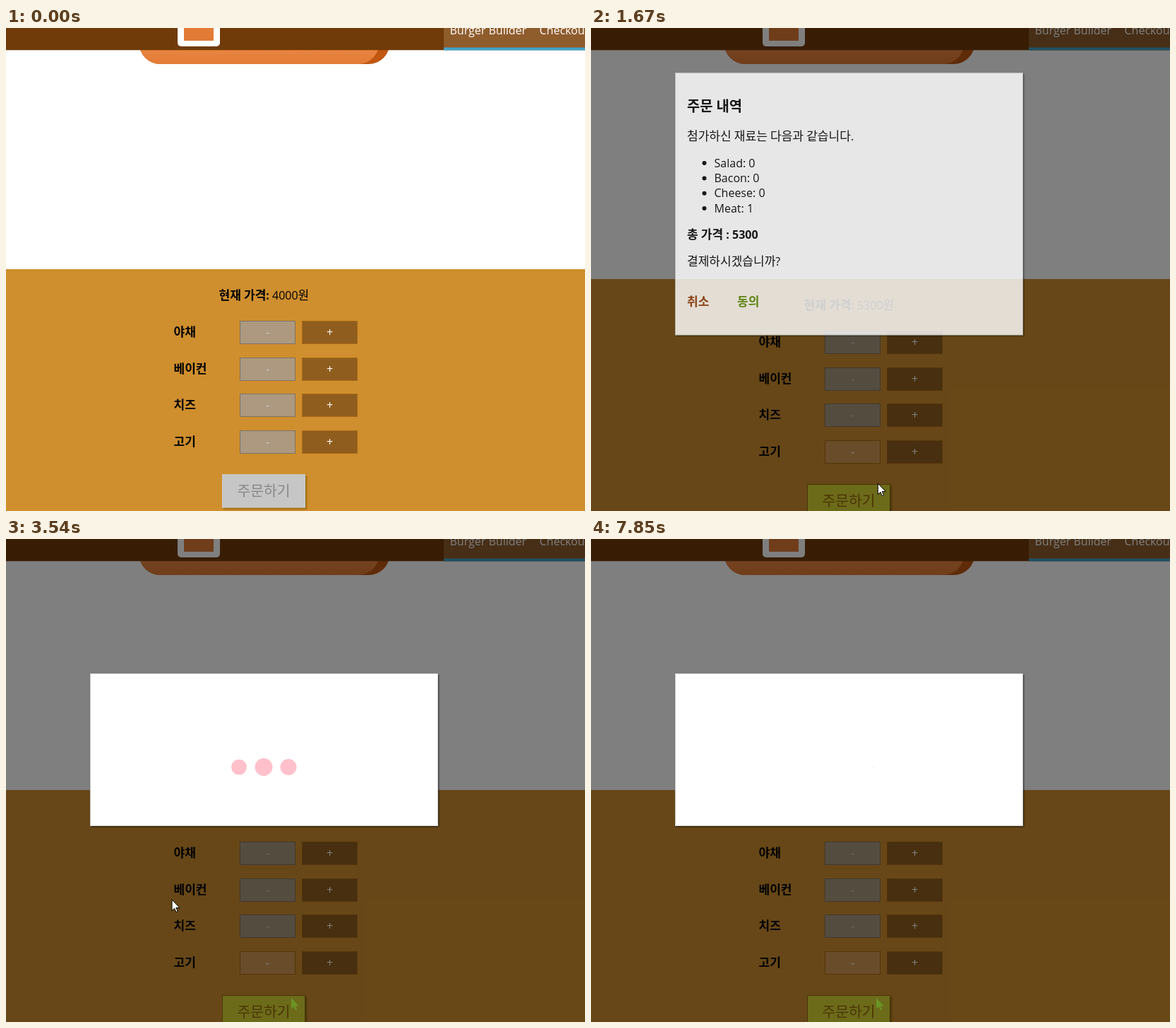
An HTML page that plays this animation: 820 by 683 pixels, repeating every 8160 ms.

```html
<!DOCTYPE html>
<html lang="ko">
<head>
<meta charset="utf-8">
<title>Burger Builder</title>
<style>
html, body { margin: 0; width: 100%; height: 100%; overflow: hidden; background: #fff; }
svg { display: block; width: 100%; height: 100%; }
text { font: 16px "Open Sans", "Noto Sans CJK KR", "Noto Sans CJK", sans-serif; white-space: pre; }
text.bold { font-weight: bold; }
text.mid { text-anchor: middle; }
tspan.ko { font-size: 1.065em; }
</style>
</head>
<body>
<svg id="stage" viewBox="0 0 820 683">
  <defs>
    <linearGradient id="bread" gradientUnits="userSpaceOnUse" x1="0" y1="12" x2="0" y2="51">
      <stop offset="0" stop-color="#f08e4a"/><stop offset="1" stop-color="#e27b36"/>
    </linearGradient>
    <filter id="soft" x="-10%" y="-10%" width="120%" height="120%"><feGaussianBlur stdDeviation="0.8"/></filter>
    <path id="bun" d="M188.5 10H543.5V21A30 30 0 0 1 513.5 51H218.5A30 30 0 0 1 188.5 21Z"/>
    <clipPath id="bunClip"><use href="#bun"/></clipPath>
    <path id="arrowShape" d="M0 0V15.6L3.6 12.3 6 17.6 8.2 16.6 5.9 11.4H10.8Z"/>
  </defs>
  <rect width="820" height="683" fill="#fff"/>
  <use href="#bun" fill="#c15711"/>
  <g clip-path="url(#bunClip)"><use href="#bun" x="-15" fill="url(#bread)"/></g>
  <g id="panel"></g>
  <g id="toolbar">
    <rect width="820" height="31.3" fill="#703b09"/>
    <rect x="620" width="200" height="28" fill="#8f5c2c"/>
    <rect x="620" y="27.6" width="200" height="3.9" fill="#40a4c8"/>
    <rect x="243" y="-40" width="60" height="66" rx="5" fill="#fff"/>
    <rect x="252" y="-24" width="42" height="42" fill="#e27b36"/>
  </g>
  <rect id="backdrop" width="820" height="683" fill="#000" fill-opacity=".5"/>
  <use id="hoverMark" href="#arrowShape" x="404" y="649" fill="#6c9424"/>
  <g id="modal"></g>
  <circle id="click" r="12" fill="#ff0" fill-opacity=".6"/>
  <g id="cursor" stroke="#000" stroke-width="1" fill="#fff" stroke-linejoin="round">
    <use id="arrow" href="#arrowShape"/>
    <path id="hand" d="M-2 10V1.5Q0-1 2 1.5V6.5L8 8Q10 8.5 10 10V13Q9 15 8.5 18H0Q-2 14-5.5 10.5Q-5 8-2 10.5M2 6.5V10M5 7.5V10.5M7.7 8V11"/>
  </g>
</svg>
<script>
const LOOP = 8160, TICK = 77.1, FIRST = 440;
const $ = id => document.getElementById(id);

function add(parent, tag, attrs, content) {
  const el = document.createElementNS('http://www.w3.org/2000/svg', tag);
  for (const key in attrs) el.setAttribute(key, attrs[key]);
  if (content) el.textContent = content;
  return parent.appendChild(el);
}

// Hangul runs are set slightly larger than the Latin text around them.
function write(el, string) {
  el.textContent = '';
  for (const run of string.split(/([가-힣]+)/)) {
    if (run) add(el, 'tspan', /[가-힣]/.test(run) ? { class: 'ko' } : {}, run);
  }
}

function label(parent, x, y, string, cls = '', fill = '#000', size = 16) {
  const el = add(parent, 'text', { x, y, class: cls, fill, style: `font-size:${size}px` });
  write(el, string);
  return el;
}

function button(parent, x, y, w, h, string, baseline, size) {
  const box = add(parent, 'rect', { x: x + .5, y: y + .5, width: w - 1, height: h - 1 });
  const text = label(parent, x + w / 2, baseline, string, 'mid', '#fff', size);
  return (fill, stroke, color) => {
    box.setAttribute('fill', fill);
    box.setAttribute('stroke', stroke);
    text.setAttribute('fill', color);
  };
}

label($('toolbar'), 628.5, 9, 'Burger Builder', '', '#fff');
label($('toolbar'), 755.5, 9, 'Checkout', '', '#fff');

// Order panel
const panel = $('panel');
add(panel, 'rect', { y: 341, width: 820, height: 360, fill: '#cf8f2e' });
label(panel, 301.5, 384, '현재 가격:', 'bold');
const price = label(panel, 377, 384, '4000원');
let meatLess, meatMore;
['야채', '베이컨', '치즈', '고기'].forEach((name, i) => {
  const y = Math.round(414 + i * 51.6);
  label(panel, 237.5, y + 22, name, 'bold');
  meatLess = button(panel, 331, y, 79, 33, '-', y + 22);
  meatMore = button(panel, 419, y, 79, 33, '+', y + 22);
  meatLess('#ac9980', '#7e7365', '#ccc');
  meatMore('#8f5e1e', '#aa6817', '#fff');
});
add(panel, 'rect', { x: 308, y: 633, width: 118, height: 47.5, fill: '#966909', filter: 'url(#soft)' });
const order = button(panel, 306, 631, 118, 47.5, '주문하기', 662, 19.2);

// Summary dialog
const modal = $('modal');
const shadow = add(modal, 'rect', { x: 120.5, y: 191.5, width: 492, fill: '#000', filter: 'url(#soft)' });
const sheet = add(modal, 'rect', { x: 119.5, y: 190.5, width: 492, fill: '#fff', stroke: '#ccc' });
const summary = add(modal, 'g', {});
label(summary, 136, 245, '주문 내역', 'bold', '#000', 18.72);
label(summary, 136, 286, '첨가하신 재료는 다음과 같습니다.');
['Salad: 0', 'Bacon: 0', 'Cheese: 0', 'Meat: 1'].forEach((item, i) => {
  const y = 323.5 + i * 21.33;
  add(summary, 'circle', { cx: 160.5, cy: y - 5.5, r: 3 });
  label(summary, 174.5, y, item);
});
label(summary, 136, 425, '총 가격 : 5300', 'bold');
label(summary, 136, 462.5, '결제하시겠습니까?');
label(summary, 136, 520, '취소', 'bold', '#944317');
label(summary, 207, 520, '동의', 'bold', '#5c9210');
const dots = [330, 365, 400].map(cx => add(modal, 'circle', { cx, cy: 322.5, fill: '#ffc0cb' }));

// Cubic easing with control points (x1, 0) and (x2, 1)
const easing = (x1, x2) => p => {
  if (p <= 0) return 0;
  if (p >= 1) return 1;
  let lo = 0, hi = 1, s;
  for (let i = 0; i < 20; i++) {
    s = (lo + hi) / 2;
    const x = 3 * s * (1 - s) * ((1 - s) * x1 + s * x2) + s ** 3;
    if (x < p) lo = s; else hi = s;
  }
  return s * s * (3 - 2 * s);
};
const easeOut = easing(0, .58), easeInOut = easing(.42, .58);

// Pointer stops: time, x, y
const path = [
  [440, 713, 659], [595, 590, 620], [748, 464, 587], [1057, 464, 587],
  [1365, 405, 652], [1519, 405, 652], [1750, 407, 640], [2050, 345, 585],
  [2350, 260, 528], [2590, 235, 510], [3740, 235, 510], [4300, 238, 511],
  [5440, 238, 511], [5600, 380, 555], [5914, 713, 641], [6140, 770, 660],
  [6290, 776, 672], [6370, 776, 690]
];
function pointer(t) {
  const i = path.findIndex(stop => stop[0] > t);
  if (i < 1) return path[path.length - 1].slice(1);
  const [t0, x0, y0] = path[i - 1], [t1, x1, y1] = path[i], k = (t - t0) / (t1 - t0);
  return [x0 + (x1 - x0) * k, y0 + (y1 - y0) * k];
}

const within = (t, from, to) => t >= from && t < to;
const show = (el, on) => el.setAttribute('visibility', on ? 'visible' : 'hidden');

function dotRadius(t, lead) {
  const p = ((t - 2945 + lead + 1800) % 1800) / 720;
  const grow = p < 1 ? easeInOut(p) : 1 - easeInOut(p - 1);
  return Math.max(0, 13 * grow - .5);
}

function draw(time) {
  const t = time < FIRST - 8 ? 0 : FIRST + Math.floor((time - FIRST + 8) / TICK) * TICK;
  const added = t >= 1050, open = t >= 1500, loading = t >= 2960;

  panel.setAttribute('transform', `translate(0 ${added ? 14 : 0})`);
  write(price, added ? '5300원' : '4000원');
  if (added) meatLess('#d39952', '#aa6817', '#fff');
  else meatLess('#ac9980', '#7e7365', '#ccc');
  meatMore(within(t, 660, 1130) ? '#99702e' : '#8f5e1e', '#aa6817', '#fff');
  if (added) order(within(t, 1360, 1500) ? '#a0db41' : '#dad735', '#966909', '#966909');
  else order('#c7c6c6', '#ccc', '#888');

  show($('backdrop'), open);
  show($('hoverMark'), t >= 1740);
  show(modal, open);
  const slide = easeOut((t - 1484) / 300);
  modal.setAttribute('transform', `translate(0 ${-683 * (1 - slide)})`);
  modal.setAttribute('opacity', slide);
  const height = loading ? 215 : 370.5;
  sheet.setAttribute('height', height);
  shadow.setAttribute('height', height);
  summary.setAttribute('display', loading ? 'none' : 'inline');
  dots.forEach((dot, i) => dot.setAttribute('r', loading ? dotRadius(t, 320 - i * 160) : 0));

  const [x, y] = pointer(t);
  $('cursor').setAttribute('transform', `translate(${x} ${y})`);
  show($('cursor'), within(t, 440, 6400));
  const pointing = within(t, 660, 1130) || within(t, 1360, 1500) || within(t, 2740, 2960);
  $('hand').setAttribute('display', pointing ? 'inline' : 'none');
  $('arrow').setAttribute('display', pointing ? 'none' : 'inline');
  const click = $('click');
  click.setAttribute('cx', x - 1);
  click.setAttribute('cy', y + 1);
  show(click, within(t, 975, 1050) || within(t, 1435, 1500) || within(t, 2900, 2960));
}

const start = performance.now();
function loop() {
  draw((performance.now() - start) % LOOP);
  requestAnimationFrame(loop);
}
loop();
</script>
</body>
</html>
```
